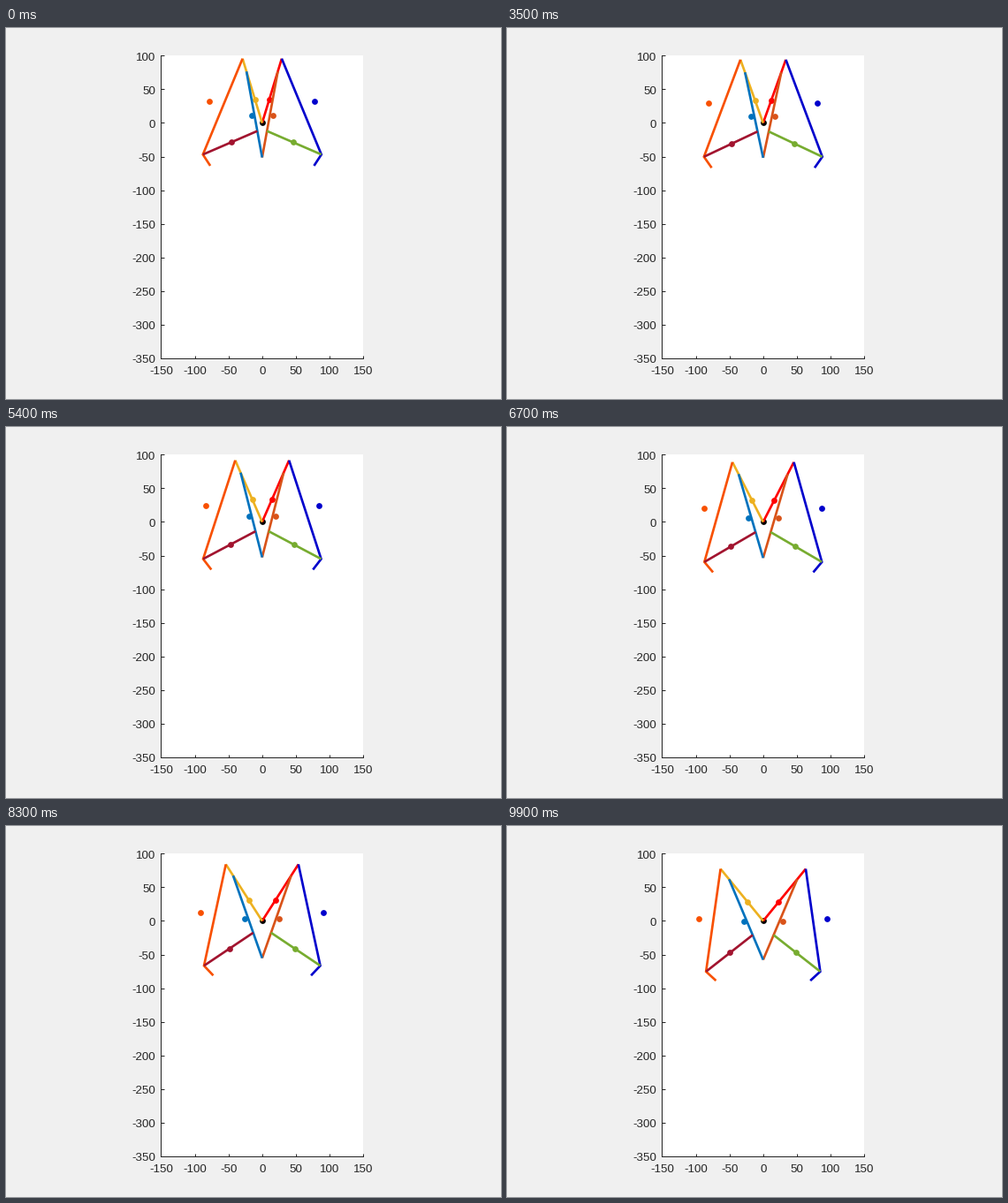
Write a matplotlib script that moves like this. It is 560 px wide and 420 px high and loops after 10 s.

```python
import numpy as np
import matplotlib.pyplot as plt
from matplotlib.animation import FuncAnimation

W, H, DPI = 560, 420, 100
FRAMES, STEP = 100, 100
PX = 72 / DPI
INK = "#262626"

plt.rcParams["font.family"] = "Liberation Sans"

# Linkage dimensions
CRANK, PIVOT, ROD, BRANCH = 100, 80, 130, 40
SHIN, LINK, FOOT = 154.3, 88, 20

fig = plt.figure(figsize=(W / DPI, H / DPI), dpi=DPI, facecolor="#f0f0f0")
left, right, top, bottom = 175.45, 404.1, 31.4, 373.8
ax = fig.add_axes([left / W, 1 - bottom / H, (right - left) / W, (bottom - top) / H])
xticks, yticks = range(-150, 151, 50), range(-350, 101, 50)
ax.set(xlim=(-150, 150), ylim=(-350, 100), xticks=xticks, yticks=yticks)
ax.spines[["top", "right"]].set_visible(False)
ax.spines[["left", "bottom"]].set(color=INK, linewidth=PX)
ax.tick_params(direction="in", length=3.5 * PX, width=PX, color=INK,
               labelleft=False, labelbottom=False)


def tick_label(value, at, dx, dy, ha, va):
    ax.annotate(str(value), at, xytext=(dx * PX, dy * PX), textcoords="offset points",
                ha=ha, va=va, color=INK, fontsize=13.33 * PX, annotation_clip=False)


for v in xticks:
    tick_label(v, (v, -350), 0, -9.5, "center", "top")
for v in yticks:
    tick_label(v, (-150, v), -6.5, -1, "right", "center_baseline")


def unit(angle):
    return np.array([np.cos(angle), np.sin(angle)])


def heading(v):
    return np.arctan2(v[1], v[0])


def meet(a, ra, b, rb):
    """Intersection of two circles, on the left of the way from a to b."""
    d = np.hypot(*(b - a))
    along = (ra**2 - rb**2 + d**2) / (2 * d)
    u = (b - a) / d
    return a + along * u + np.sqrt(ra**2 - along**2) * np.array([-u[1], u[0]])


def pose(t):
    """Path and mass centre of each right-hand part at t seconds."""
    tilt = np.radians(16.9 + 0.2275 * t**2)
    arm = unit(np.pi / 2 - tilt)
    tip, pivot = CRANK * arm, PIVOT * arm
    slider = np.array([0, pivot[1] - np.sqrt(ROD**2 - pivot[0]**2)])
    rod = (pivot - slider) / ROD
    joint = slider + BRANCH * rod
    knee = meet(tip, SHIN, joint, LINK)
    shin = heading(knee - tip)
    toe = knee + FOOT * unit(shin - np.radians(55.5))
    return {
        "crank": ([(0, 0), tip], 36 * arm),
        "shin": ([tip, knee, toe], tip + 80.5 * unit(shin + np.radians(15.3))),
        "rod": ([slider, pivot], slider + 64 * unit(heading(rod) - np.radians(4))),
        "link": ([joint, knee], joint + 42.5 * (knee - joint) / LINK),
    }


COLORS = {
    "crank": ("#ff0000", "#edb120"),
    "shin": ("#0000cc", "#f85000"),
    "rod": ("#d95319", "#0072bd"),
    "link": ("#77ac30", "#a2142f"),
}

ax.plot(0, 0, "o", color="black", ms=6.8 * PX, mew=0, zorder=2)
parts = []
for name, pair in COLORS.items():
    for side, color in zip((1, -1), pair):
        line, = ax.plot([], [], color=color, lw=2.67 * PX, zorder=3, clip_on=False,
                        solid_capstyle="butt", solid_joinstyle="miter")
        dot, = ax.plot([], [], "o", color=color, ms=6.8 * PX, mew=0, zorder=3)
        parts.append((name, side, line, dot))


def update(i):
    now = pose(i * STEP / 1000)
    for name, side, line, dot in parts:
        path, centre = now[name]
        x, y = np.transpose(path)
        line.set_data(side * x, y)
        dot.set_data([side * centre[0]], [centre[1]])
    return [artist for part in parts for artist in part[2:]]


anim = FuncAnimation(fig, update, frames=FRAMES, interval=STEP,
                     repeat=True, repeat_delay=0, blit=False)
plt.show()
```
